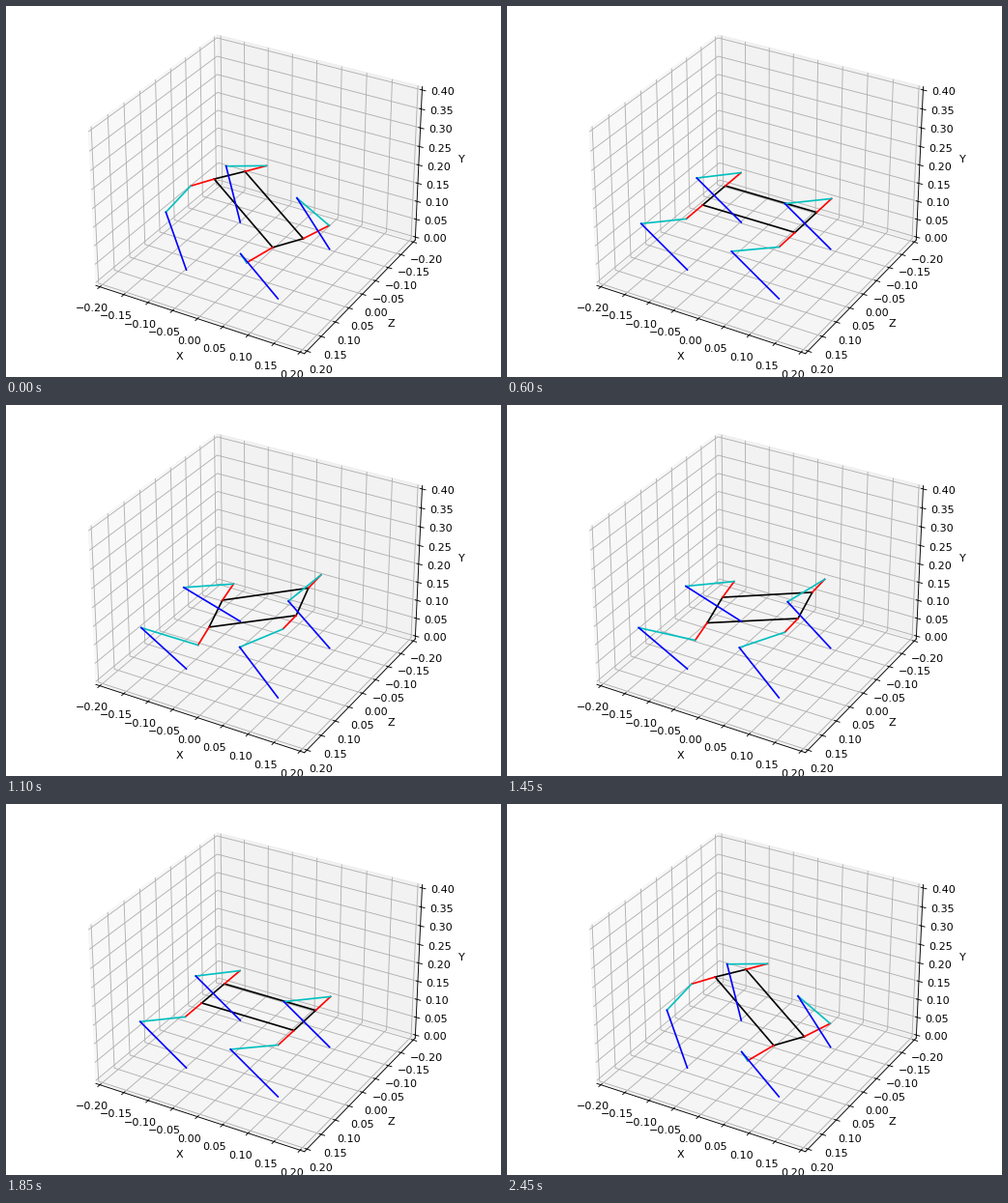
A matplotlib script that plays this animation: 512x384 px, repeating every 2.5 s.

```python
import numpy as np
import matplotlib.pyplot as plt
from matplotlib.animation import FuncAnimation

plt.rcParams["font.family"] = "DejaVu Sans"

# Robot dimensions in metres
LENGTH, WIDTH, HEIGHT = 0.186, 0.078, 0.14
HIP, UPPER, LOWER = 0.055, 0.1075, 0.130

# Signs of the body corners along x and z, in drawing order
CORNERS = [(-1, 1), (1, 1), (1, -1), (-1, -1)]
SWING = np.radians([15, 15, 30])  # roll, yaw, pitch
STEPS = 25
FRAMES = 2 * STEPS


def rotation(roll, yaw, pitch):
    """Rotation matrix Rx(roll) @ Ry(yaw) @ Rz(pitch)."""
    cr, sr = np.cos(roll), np.sin(roll)
    cy, sy = np.cos(yaw), np.sin(yaw)
    cp, sp = np.cos(pitch), np.sin(pitch)
    rx = np.array([[1, 0, 0], [0, cr, -sr], [0, sr, cr]])
    ry = np.array([[cy, 0, sy], [0, 1, 0], [-sy, 0, cy]])
    rz = np.array([[cp, -sp, 0], [sp, cp, 0], [0, 0, 1]])
    return rx @ ry @ rz


def solve_leg(foot, side):
    """Hip end and knee for a foot, all relative to the body corner."""
    x, y, z = foot[0], foot[1], side * foot[2]
    drop = np.sqrt(max(y * y + z * z - HIP ** 2, 0))
    tilt = np.arctan2(z, -y) - np.arctan2(HIP, drop)
    out = np.array([0, np.sin(tilt), side * np.cos(tilt)])
    down = np.array([0, -np.cos(tilt), side * np.sin(tilt)])

    reach = np.hypot(x, drop)
    bend = (UPPER ** 2 + reach ** 2 - LOWER ** 2) / (2 * UPPER * reach)
    swing = np.arctan2(x, drop) - np.arccos(np.clip(bend, -1, 1))
    hip = HIP * out
    knee = hip + UPPER * (np.cos(swing) * down + np.array([np.sin(swing), 0, 0]))
    return hip, knee


def pose(level):
    """Body outline and leg joints for a tilt level from -1 to 1."""
    rot = rotation(*(level * SWING))
    center = np.array([0, HEIGHT, 0])
    body, legs = [], []
    for sx, sz in CORNERS:
        corner = center + rot @ [sx * LENGTH / 2, 0, sz * WIDTH / 2]
        foot = np.array([sx * LENGTH / 2, 0, sz * (WIDTH / 2 + HIP)])
        hip, knee = solve_leg(rot.T @ (foot - corner), sz)
        body.append(corner)
        legs.append([corner, corner + rot @ hip, corner + rot @ knee, foot])
    return body, legs


def place(line, points):
    x, y, z = np.transpose(points)
    line.set_data_3d(x, z, y)


fig = plt.figure(figsize=(6.4, 4.8), dpi=80)
ax = fig.add_axes([0, 0, 1, 1], projection="3d")
ax.view_init(elev=30, azim=-60)
ax.set(xlabel="X", ylabel="Z", zlabel="Y")

# Limits reach slightly past the outermost ticks
margin = 0.4 / 48
ax.set_xlim(-0.2 - margin, 0.2 + margin)
ax.set_ylim(0.2 + margin, -0.2 - margin)
ax.set_zlim(-margin, 0.4 + margin)
ax.set_xticks(np.linspace(-0.2, 0.2, 9))
ax.set_yticks(np.linspace(-0.2, 0.2, 9))
ax.set_zticks(np.linspace(0, 0.4, 9))
for axis in (ax.xaxis, ax.yaxis, ax.zaxis):
    axis.set_major_formatter("{x:.2f}")


def new_line(color):
    return ax.plot([], [], [], color=color, lw=1.5)[0]


body_lines = [new_line("k") for _ in CORNERS]
leg_lines = [[new_line(c) for c in "rcb"] for _ in CORNERS]


def update(frame):
    # Tilt ramps up, then back down, resting one step at each end
    step = min(frame, FRAMES - 1 - frame)
    body, legs = pose(2 * step / (STEPS - 1) - 1)
    for i, line in enumerate(body_lines):
        place(line, [body[i], body[(i + 1) % len(body)]])
    for lines, joints in zip(leg_lines, legs):
        for line, start, end in zip(lines, joints, joints[1:]):
            place(line, [start, end])


anim = FuncAnimation(fig, update, frames=FRAMES, interval=50, repeat=True)
plt.show()
```
